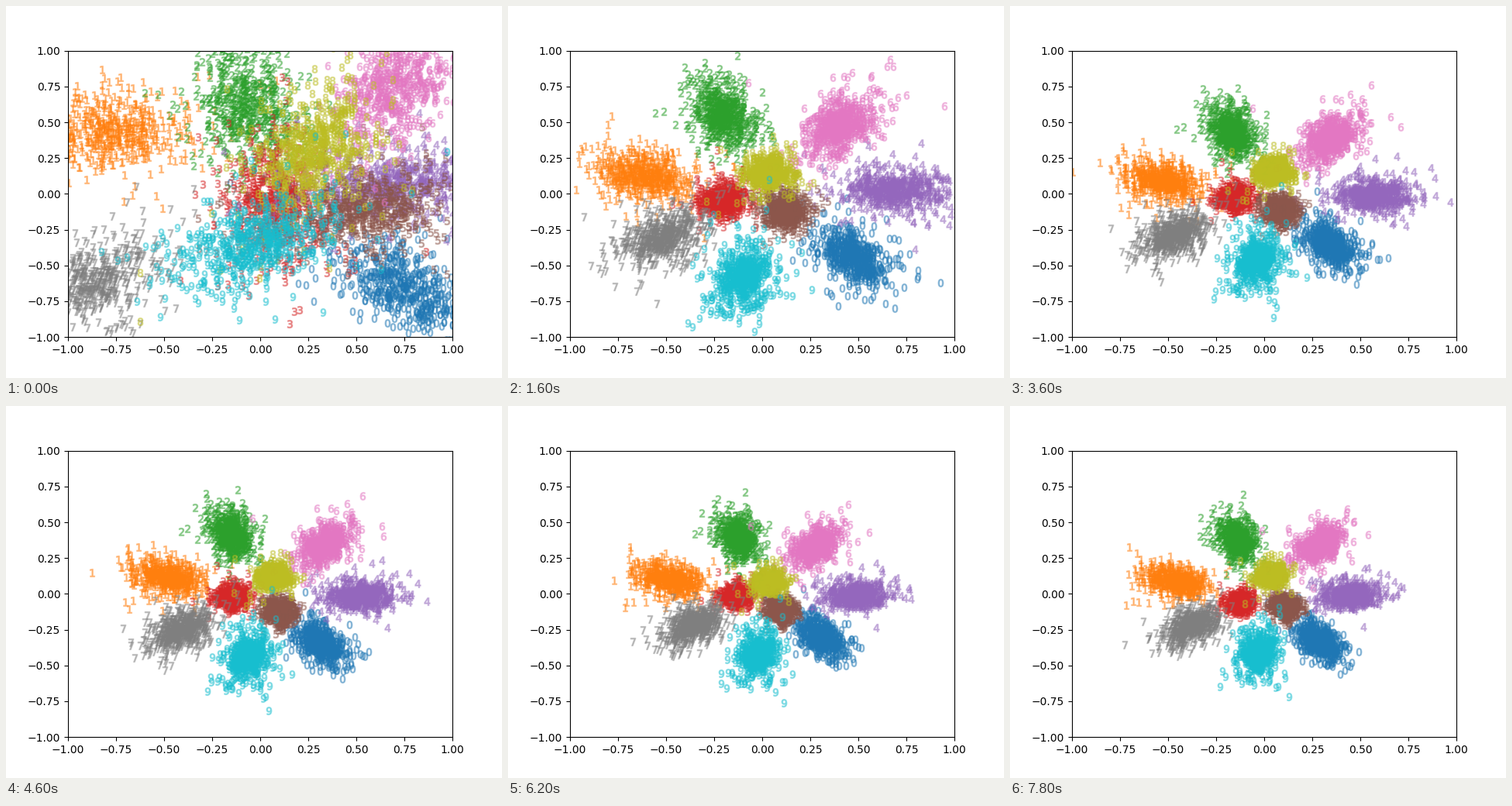
These frames come from a looping animation (640 by 480 pixels, 8000 ms). A matplotlib script:

```python
import numpy as np
import matplotlib.pyplot as plt
from matplotlib.animation import FuncAnimation

FRAMES, INTERVAL = 40, 200
COUNT = 550
OUTER = [4, 6, 2, 1, 7, 9, 0]  # counter-clockwise around the ring
INNER = [8, 3, 5]

# Where each untrained cloud begins: x, y and the angle of its long axis.
START = {
    0: (.78, -.67, 315), 1: (-.82, .43, 180), 2: (-.06, .60, 100),
    3: (.08, -.08, 90), 4: (.72, .05, 10), 5: (.50, -.10, 370),
    6: (.70, .72, 65), 7: (-.85, -.65, 217), 8: (.29, .32, 70),
    9: (-.04, -.32, 215),
}


def home(digit):
    """Settled angle and radii: seven clouds on a ring, three near the centre."""
    if digit in INNER:
        return np.radians(72 + 120 * INNER.index(digit)), .125, .125
    angle = 2 * np.pi * OUTER.index(digit) / len(OUTER)
    return angle + np.radians(5 - 6 * np.cos(angle)), .47, .40


def mix(a, b, weight):
    return a + (b - a) * weight


class Cloud:
    def __init__(self, ax, digit):
        rng = np.random.default_rng(digit)
        self.base = rng.normal(size=(2, COUNT, 2))
        self.tail = np.exp(rng.normal(-.05, .3, (COUNT, 1)))
        x, y, tilt = START[digit]
        self.start, self.start_tilt = np.array([x, y]), np.radians(tilt)
        self.angle, rx, ry = home(digit)
        self.home = np.array([rx * np.cos(self.angle), ry * np.sin(self.angle)])
        self.dots = ax.scatter([], [], s=50, marker=f"${digit}$",
                               color=f"C{digit}", alpha=.38)

    def place(self, frame, shift):
        raw = np.exp(-frame / 1.2)            # share of the untrained layout
        grow = .95 + .9 * np.exp(-frame / 13)  # slow contraction afterwards
        radius = np.hypot(*self.home)
        spread = np.array([.02 + .14 * radius, .03 + .045 * radius])
        spread = mix(spread * grow ** 1.4, np.array([.24, .14]), raw)
        centre = mix(self.home * grow, self.start, raw) + shift
        tilt = mix(self.angle, self.start_tilt, raw)

        # Points slowly trade places inside the cloud.
        a, b = self.base
        turn = .03 * frame
        u, v = ((np.cos(turn) * a + np.sin(turn) * b) * self.tail * spread).T
        c, s = np.cos(tilt), np.sin(tilt)
        self.dots.set_offsets(centre + np.column_stack([c * u - s * v,
                                                        s * u + c * v]))


fig, ax = plt.subplots(figsize=(6.4, 4.8), dpi=100)
ax.set_xlim(-1, 1)
ax.set_ylim(-1, 1)
clouds = [Cloud(ax, digit) for digit in range(10)]


def update(frame):
    shifts = np.random.default_rng(100 + frame).normal(0, .015, (10, 2))
    for cloud, shift in zip(clouds, shifts):
        cloud.place(frame, shift)
    return [cloud.dots for cloud in clouds]


anim = FuncAnimation(fig, update, frames=FRAMES, interval=INTERVAL, repeat=True)
plt.show()
```
